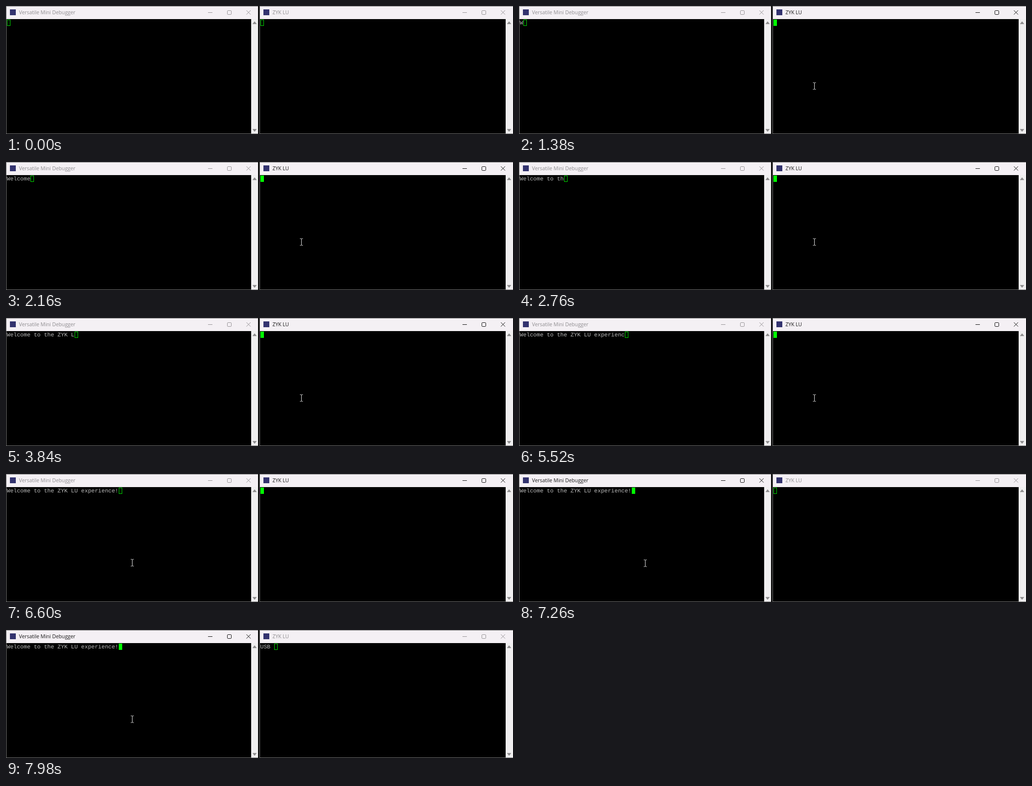
Recreate the animation shown at these times as an HTML page. Size 1034 by 264 pixels, loop 8 s.

```html
<!DOCTYPE html>
<html lang="en">
<head>
<meta charset="utf-8">
<title>Two terminals</title>
<style>
  html, body { margin: 0; width: 100%; height: 100%; overflow: hidden; background: #000; }
  svg { display: block; width: 1034px; height: 264px; }
  .title { font: 10.35px "Open Sans", "Noto Sans", sans-serif; }
  .term { font: 11.5px "Liberation Mono", "Courier New", monospace; fill: #bbb; white-space: pre; text-rendering: geometricPrecision; }
  .icons { fill: none; stroke-width: 1; }
</style>
</head>
<body>
<svg id="stage" viewBox="0 0 1034 264"></svg>
<script>
const LOOP = 8000, CELL = 6.9;
const LEFT_TEXT = "Welcome to the ZYK LU experience!";
const RIGHT_TEXT = "USB ";

// [time, characters typed]
const LEFT_KEYS = [[1320, 1], [1500, 2], [2730, 13], [3820, 20], [5500, 31], [5800, 33]];
const RIGHT_KEYS = [[7500, 1], [7920, 4]];
// [time, x, y] of the mouse pointer
const POINTER = [
  [360, 612, 248], [480, 607, 205], [600, 603, 165], [6000, 603, 165],
  [6120, 540, 222], [6240, 430, 254], [6360, 325, 232], [6480, 270, 194],
  [6560, 258, 183], [6640, 258, 183], [6660, 258, 184]
];
const FOCUS_RIGHT = 700, FOCUS_LEFT = 6650;

const stage = document.getElementById("stage");

function add(parent, tag, attrs, text) {
  const node = document.createElementNS("http://www.w3.org/2000/svg", tag);
  for (const key in attrs) node.setAttribute(key, attrs[key]);
  if (text) node.textContent = text;
  parent.append(node);
  return node;
}

function rect(parent, x, y, width, height, fill) {
  return add(parent, "rect", { x, y, width, height, fill });
}

function makeWindow(x, width, name, text) {
  const g = add(stage, "g", { transform: `translate(${x} 0)` });
  const bar = width - 16;
  rect(g, 0, 0, width, 264, "#777");
  rect(g, 1, 1, width - 1, 26, "#f4f0f4");
  rect(g, 1, 27, bar, 236, "#000");
  rect(g, bar + 1, 27, 15, 236, "#f0eff0");
  add(g, "path", {
    d: `M${bar + 4} 37l4-5 4 5zM${bar + 4} 254l4 5 4-5z`,
    fill: "#8b8a8b", stroke: "#8b8a8b", "stroke-width": .5, "stroke-linejoin": "round"
  });
  rect(g, 8, 7, 12, 12, "#33336f");
  const title = add(g, "text", { x: 26.5, y: 17.3, class: "title" }, name);
  const right = width - 16;
  const icons = add(g, "g", { class: "icons" });
  add(icons, "path", { d: `M${right - 87} 13.5h9` });
  add(icons, "rect", { x: right - 47.5, y: 9.5, width: 8, height: 8, rx: 1.2 });
  add(icons, "path", { d: `M${right - 8.7} 9l8.6 8.6m0-8.6l-8.6 8.6` });
  const line = add(g, "text", { x: 1.5, y: 38, class: "term" });
  const caret = add(g, "rect", { y: 28.5, height: 12 });

  return (count, active) => {
    title.setAttribute("fill", active ? "#1a1a1a" : "#8f8d90");
    icons.setAttribute("stroke", active ? "#111" : "#969396");
    line.textContent = text.slice(0, count);
    caret.setAttribute("x", Math.round(2 + count * CELL) + .5);
    caret.setAttribute("width", 6);
    caret.setAttribute("fill", active ? "#0f0" : "none");
    caret.setAttribute("stroke", active ? "#0f0" : "#00d800");
  };
}

// Linear value of one column at a time; held past the last step.
function sample(steps, t, column) {
  if (t < steps[0][0]) return 0;
  for (let i = 1; i < steps.length; i++) {
    const a = steps[i - 1], b = steps[i];
    if (t < b[0]) return a[column] + (b[column] - a[column]) * (t - a[0]) / (b[0] - a[0]);
  }
  return steps[steps.length - 1][column];
}

const typed = (keys, t) => Math.floor(sample(keys, t, 1) + 1e-6);

const drawLeft = makeWindow(0, 515, "Versatile Mini Debugger", LEFT_TEXT);
const drawRight = makeWindow(517, 517, "ZYK LU", RIGHT_TEXT);
rect(stage, 514, 0, 3, 264, "#0c0c0c");
const pointer = add(stage, "path", {
  d: "M-3 -6.5h2.2l.8 .8 .8-.8h2.2M0 -6v13M-3 7.5h2.2l.8-.8 .8 .8h2.2",
  fill: "none", stroke: "#e8e8e8", "stroke-width": 1
});

function draw(t) {
  drawLeft(typed(LEFT_KEYS, t), t >= FOCUS_LEFT);
  drawRight(typed(RIGHT_KEYS, t), t >= FOCUS_RIGHT && t < FOCUS_LEFT);
  pointer.setAttribute("visibility", t < POINTER[0][0] ? "hidden" : "visible");
  const x = Math.round(sample(POINTER, t, 1)) - .5;
  const y = Math.round(sample(POINTER, t, 2));
  pointer.setAttribute("transform", `translate(${x} ${y - .5})`);
}

const start = performance.now();
function tick() {
  draw((performance.now() - start) % LOOP);
  requestAnimationFrame(tick);
}
tick();
</script>
</body>
</html>
```
